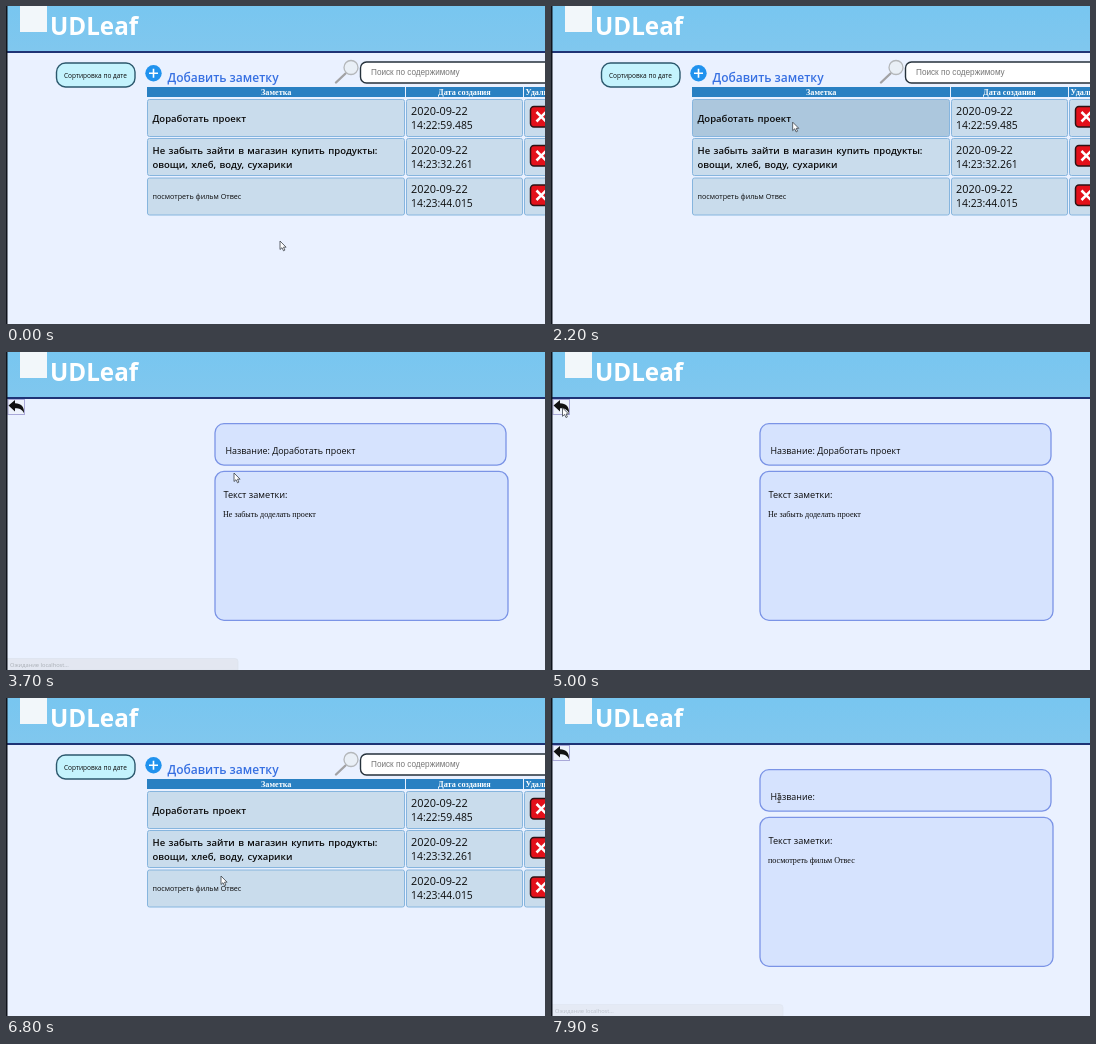
These frames come from a looping animation (539 by 318 pixels, 8000 ms). An HTML page:

```html
<!DOCTYPE html>
<html lang="ru">
<head>
<meta charset="utf-8">
<style>
  html, body { margin: 0; width: 100%; height: 100%; overflow: hidden; background: #eaf1ff; }
  svg { display: block; width: 539px; height: 318px; }
  text { font-family: "Open Sans", "Noto Sans", sans-serif; fill: #0a0a0a; }
  .serif { font-family: "Liberation Serif", "Times New Roman", serif; }
  .sans { font-family: "Liberation Sans", Arial, sans-serif; }
  .bold { font-weight: 700; }
  .head { font-weight: 600; word-spacing: 1px; }
  .cell { fill: #c9dcec; stroke: #86b5de; }
  .panel { fill: #d6e3fe; stroke: #7b94e6; stroke-width: 1.3; }
</style>
</head>
<body>
<svg viewBox="0 0 539 318">
  <defs>
    <linearGradient id="sky" x2="0" y2="1">
      <stop stop-color="#78c6f0"/><stop offset="1" stop-color="#80c7ee"/>
    </linearGradient>
  </defs>
  <rect width="539" height="318" fill="#eaf1ff"/>
  <rect width="539" height="45.5" fill="url(#sky)"/>
  <rect y="45" width="539" height="2" fill="#1f3375"/>
  <rect x="14" y="-1" width="27" height="27" fill="#f2f7fa"/>
  <text x="44" y="28.5" font-size="24.2" class="bold" style="fill:#fff">UDLeaf</text>
  <g id="add">
    <circle cx="147.5" cy="67.3" r="8.2" fill="#2092ee"/>
    <path d="M143 67.3h9M147.5 62.8v9" stroke="#fff" stroke-width="1.6"/>
    <text x="161.5" y="75.5" font-size="12" font-weight="600" style="fill:#3770e2">Добавить заметку</text>
  </g>
  <g id="list"></g>
  <g id="note">
    <rect x="2" y="47.5" width="16.5" height="15" fill="#edf2fc" stroke="#a9a8d8"/>
    <path d="M2.5 53.5L9 48v3.2c6 0 9.5 3.5 9 10c-2-4-5-5-9-4.9v3.2z" fill="#111"/>
    <rect class="panel" x="209" y="71.7" width="291" height="41.5" rx="9"/>
    <rect class="panel" x="209" y="119.3" width="293" height="149" rx="9"/>
    <text id="title" x="219.5" y="101.5" font-size="8.9"></text>
    <text x="217.5" y="146.3" font-size="9.2">Текст заметки:</text>
    <text id="body" class="serif" x="217" y="165" font-size="8.1"></text>
  </g>
  <g id="status">
    <path d="M1 306.500h228q3 0 3 3V318H1z" fill="#dadcdf" stroke="#c9cdd3" stroke-width=".7"/>
    <text id="statusText" x="4" y="314.800" font-size="5.700" style="fill:#555"></text>
  </g>
  <rect width="1.500" height="318" fill="#10141c"/>
  <g id="pointer">
    <path id="arrow" d="M0 0v8.500l2-1.800l1.500 3.100l1.400-.7l-1.400-2.900h2.600z" fill="#fff" stroke="#3a4048" stroke-width=".8"/>
    <path id="beam" d="M-1.500-4.500h3M0-4.500v9M-1.500 4.500h3" fill="none" stroke="#444" stroke-width=".8"/>
  </g>
</svg>
<script>
const $ = id => document.getElementById(id);
const text = (x, y, size, str, attrs = '') =>
  `<text x="${x}" y="${y}" font-size="${size}" ${attrs}>${str}</text>`;
const box = (x, y, w, h, attrs) =>
  `<rect x="${x}" y="${y}" width="${w}" height="${h}" ${attrs}/>`;

const columns = [[141.5, 257, 'Заметка', 255], [400.5, 116, 'Дата создания', 432], [518.5, 60, 'Удалить', 519.5]];
const rows = [
  { y: 93.5, lines: ['Доработать проект'], time: '14:22:59.485', bold: true },
  { y: 132.5, lines: ['Не забыть зайти в магазин купить продукты:', 'овощи, хлеб, воду, сухарики'], time: '14:23:32.261', bold: true },
  { y: 172, lines: ['посмотреть фильм Отвес'], time: '14:23:44.015' }
];

function drawRow({ y, lines, time, bold }, i) {
  const size = bold ? 9.5 : 7.2;
  const first = lines.length > 1 ? 15.5 : bold ? 22.5 : 21;
  return columns.map(([x, w], c) =>
      box(x, y, w, 37, `class="cell" rx="2" ${c ? '' : `id="row${i}"`}`)).join('') +
    lines.map((s, n) => text(146.5, y + first + n * 14, size, s, bold ? 'class="head"' : '')).join('') +
    text(405, y + 15, 10.9, '2020-09-22') + text(405, y + 29, 10.4, time) +
    box(524.5, y + 7, 22, 20.5, 'rx="3.5" fill="#e3101a" stroke="#2c1214" stroke-width="1.5"') +
    `<path d="M530.5 ${y + 12.5}l9.5 9.5m0-9.5l-9.5 9.5" stroke="#fff" stroke-width="2.6"/>`;
}

$('list').innerHTML =
  box(50.5, 57, 78.5, 24, 'rx="9" fill="#c4f3fd" stroke="#2c586d" stroke-width="1.4"') +
  text(58, 71.5, 6.5, 'Сортировка по дате') +
  '<path d="M339.5 67.5L330 76.5" stroke="#a2a2a4" stroke-width="2.4" stroke-linecap="round"/>' +
  '<circle cx="345" cy="61.5" r="7" fill="#e9eff6" stroke="#b4b7ba" stroke-width="1.3"/>' +
  box(354.5, 56, 210, 21, 'rx="6" fill="#fff" stroke="#26323c" stroke-width="1.4"') +
  text(365, 69, 8.2, 'Поиск по содержимому', 'class="sans" style="fill:#777"') +
  columns.map(([x, w, label, tx]) =>
    box(x - .5, 81, w + 1, 10, 'fill="#2980c2"') +
    text(tx, 89, 8.2, label, 'class="serif bold" style="fill:#fff"')).join('') +
  rows.map(drawRow).join('');

// time, x, y
const path = [
  [0, 274, 235], [500, 274, 235], [1000, 258, 180], [1500, 248, 114], [2000, 248, 114],
  [2500, 230, 120], [3000, 228, 121], [3900, 228, 121], [4700, 25, 60], [5100, 9, 55],
  [5900, 9, 55], [6700, 215, 178], [7400, 215, 178], [7800, 228, 100], [8000, 228, 100]
];
const ramp = (t, a, b) => Math.min(1, Math.max(0, (t - a) / (b - a)));

function pointerAt(t) {
  const i = path.findIndex(p => p[0] > t);
  const [a, x, y] = path[i - 1], [b, x2, y2] = path[i];
  let k = ramp(t, a, b);
  k = k * k * (3 - 2 * k);
  return [x + (x2 - x) * k, y + (y2 - y) * k];
}

const show = (id, on) => { $(id).style.display = on ? '' : 'none'; };

function shade(i, k) {
  const mix = (a, b) => Math.round(a + (b - a) * k);
  $('row' + i).style.fill = `rgb(${mix(201, 172)},${mix(220, 199)},${mix(236, 221)})`;
}

function render(t) {
  const second = t >= 7500;
  const note = t >= 3400 && t < 5500 || second;
  const loading = t >= 5500 && t < 5800;
  show('note', note);
  show('add', !note);
  show('list', !note && !loading);
  $('title').textContent = 'Название:' + (second ? '' : ' Доработать проект');
  $('body').textContent = second ? rows[2].lines[0] : 'Не забыть доделать проект';
  shade(0, t < 5000 ? ramp(t, 1900, 2200) : 0);
  shade(2, ramp(t, 6800, 7100));

  const working = t >= 5400 && t < 6000;
  const fade = t < 5000
    ? ramp(t, 3100, 3200) * (1 - ramp(t, 3500, 3850))
    : ramp(t, 7200, 7300) * (1 - .7 * ramp(t, 7600, 7900));
  $('statusText').textContent = working ? 'Обработка запроса...' : 'Ожидание localhost...';
  $('status').style.opacity = working ? 1 : fade;

  const [x, y] = pointerAt(t);
  const beam = second && y < 113;
  show('arrow', !beam);
  show('beam', beam);
  $('pointer').setAttribute('transform', `translate(${x} ${y})`);
}

const start = performance.now();
function tick() {
  const t = (performance.now() - start) % 8000;
  render(Math.floor(t / 100) * 100);
  requestAnimationFrame(tick);
}
tick();
</script>
</body>
</html>
```
